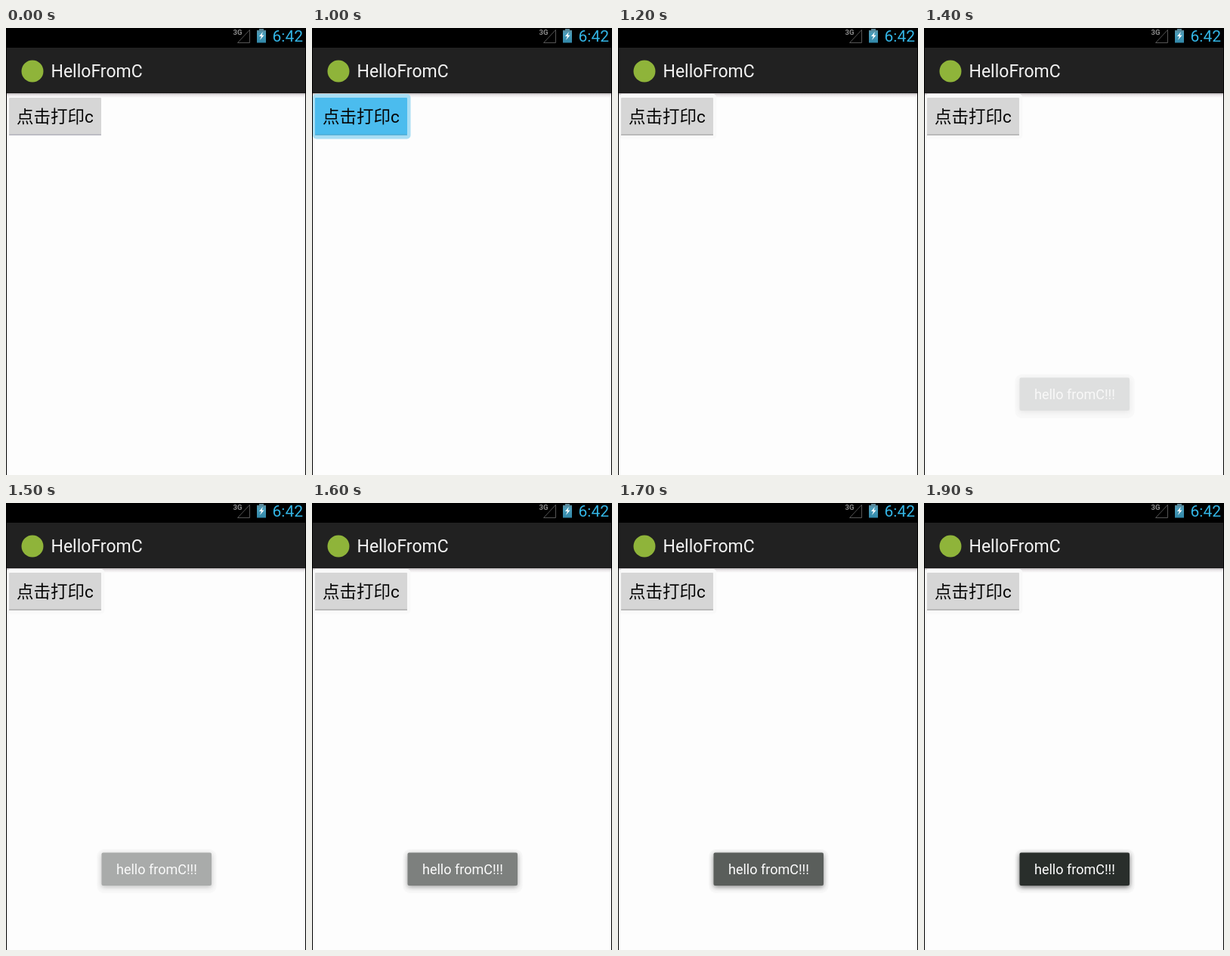
Recreate the animation shown at these times as an HTML page. Size 397 by 590 pixels, loop 2.7 s.

```html
<!DOCTYPE html>
<html lang="zh">
<head>
<meta charset="utf-8">
<style>
html, body { margin: 0; width: 100%; height: 100%; overflow: hidden; background: #000; }
svg { display: block; width: 397px; height: 590px; font-family: Roboto, "Noto Sans CJK SC", "Noto Sans CJK", sans-serif; }
#toastBox { filter: drop-shadow(0 2px 3px rgba(0, 0, 0, .6)); }
</style>
</head>
<body>
<svg viewBox="0 0 397 590">
  <defs>
    <linearGradient id="shade" x2="0" y2="1">
      <stop stop-color="#aaa6a8"/>
      <stop offset=".35" stop-color="#e6e2e4"/>
      <stop offset="1" stop-color="#fdfdfd"/>
    </linearGradient>
    <linearGradient id="charge" x2="0" y2="1">
      <stop stop-color="#5d7f8c"/>
      <stop offset=".35" stop-color="#4a9dbb"/>
      <stop offset="1" stop-color="#3187a8"/>
    </linearGradient>
  </defs>

  <rect width="397" height="590"/>
  <rect x="1" y="26" width="395" height="564" fill="#fdfdfd"/>
  <rect x="1" y="86" width="395" height="6" fill="url(#shade)"/>
  <rect x="1" y="26" width="395" height="60" fill="#212121"/>
  <rect x="1" y="85" width="395" height="1" fill="#141414"/>

  <!-- status bar -->
  <text x="300.5" y="9" font-size="9.5" font-weight="700" fill="#8c8c8c">3G</text>
  <path d="M306.5 19.5H322.5V2.5Z" fill="none" stroke="#555"/>
  <path d="M335 1h6v2h3v16.500h-12V3h3z" fill="url(#charge)"/>
  <path d="M340 5l-5 6h3l-2 5 5.500-6.500h-3z" fill="#fff"/>
  <text x="352.500" y="18" font-size="21" fill="#33b5e5">6:42</text>

  <!-- title bar -->
  <circle cx="35" cy="57" r="14.500" fill="#8fb43a"/>
  <text x="59.500" y="65" font-size="23" fill="#f3f3f3">HelloFromC</text>

  <!-- button -->
  <rect id="halo" x="1" y="87" width="129.500" height="59.500" rx="5"/>
  <rect id="face" x="4" y="92" width="122" height="49" rx="1"/>
  <rect id="edge" x="4" y="140.500" width="122" height="1"/>
  <text x="14" y="125" font-size="22.5" fill="#050505">点击打印c</text>

  <!-- toast -->
  <rect id="toastHalo" x="120.500" y="457" width="158" height="58" rx="9" fill="#f8f8f8"/>
  <g id="toast">
    <rect id="toastBox" x="126.500" y="461.500" width="145.500" height="43.500" rx="2" fill="#292e2b"/>
    <text x="146" y="490" font-size="18" fill="#fff">hello fromC!!!</text>
  </g>
</svg>
<script>
const $ = id => document.getElementById(id);
const paint = (halo, face, edge) => {
  $("halo").style.fill = halo;
  $("face").style.fill = face;
  $("edge").style.fill = edge;
};

// The toast fades in by six decelerating steps.
function toastAlpha(t) {
  const step = Math.floor((t - 1400) / 100);
  if (step < 0) return 0;
  if (step >= 5) return 1;
  return 1 - (0.94 - 0.15 * step) ** 2;
}

function draw(now) {
  const t = now % 2700;
  if (t < 1000) paint("none", "#d6d6d6", "#9696a4");
  else if (t < 1200) paint("#a9def4", "#4bbcee", "#429fc7");
  else paint("#f9f9f9", "#d6d6d6", "#929292");
  $("toast").style.opacity = toastAlpha(t);
  $("toastHalo").style.opacity = t < 1400 ? 0 : 1;
}

const start = performance.now();
function loop() {
  draw(performance.now() - start);
  requestAnimationFrame(loop);
}
loop();
</script>
</body>
</html>
```
